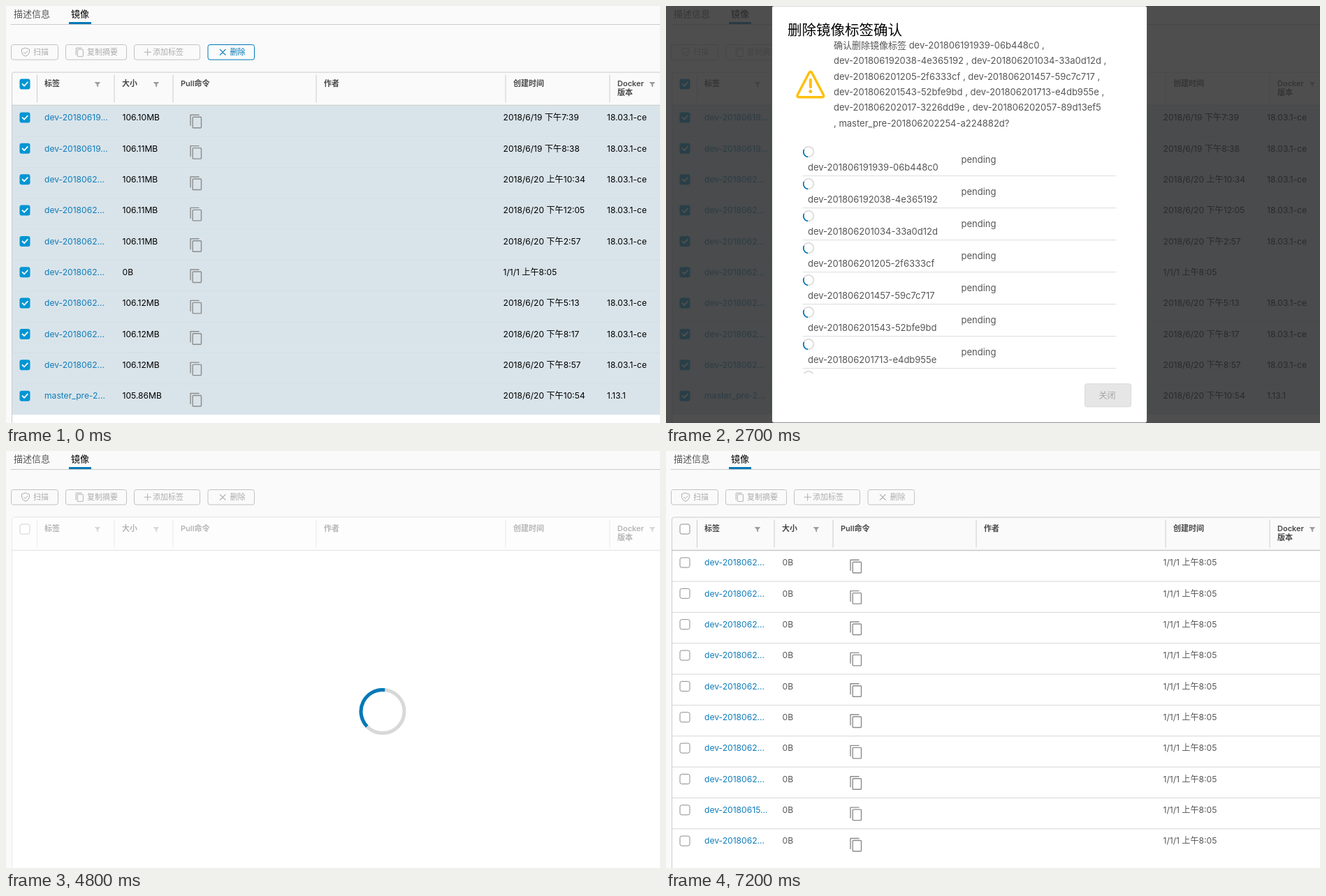
These frames come from a looping animation (936 by 598 pixels, 9200 ms). An HTML page:

```html
<!DOCTYPE html>
<html lang="zh">
<head>
<meta charset="utf-8">
<title>删除镜像标签</title>
<style>
  html, body { margin: 0; width: 100%; height: 100%; overflow: hidden; background: #fafafa; }
  svg { display: block; width: 936px; height: 598px; }
  text { font-family: Inter, "Noto Sans CJK SC", "Noto Sans CJK", sans-serif; white-space: pre; }
  .tab { font-size: 13px; }
  .btn { font-size: 11px; }
  .head { font-size: 11px; font-weight: 600; fill: #484848; }
  .cell { font-size: 12.1px; }
  .title { font-size: 20.5px; font-weight: 300; fill: #000; }
  .body { font-size: 13px; fill: #565656; }
  .action { font-size: 12px; }
</style>
</head>
<body>
<svg viewBox="0 0 936 598">
  <rect width="936" height="598" fill="#fafafa"/>
  <g id="page"></g>
  <g id="spinner"></g>
  <rect id="backdrop" width="936" height="598" fill="#313131"/>
  <g id="modal"></g>
</svg>
<script>
const LOOP = 9200, STEP = 100, ROW = 44.35;
const BLUE = '#0079b8', LINE = '#ccc';
const $ = id => document.getElementById(id);

const tags = ['dev-201806191939-06b448c0', 'dev-201806192038-4e365192', 'dev-201806201034-33a0d12d',
  'dev-201806201205-2f6333cf', 'dev-201806201457-59c7c717', 'dev-201806201543-52bfe9bd',
  'dev-201806201713-e4db955e', 'dev-201806202017-3226dd9e', 'dev-201806202057-89d13ef5',
  'master_pre-201806202254-a224882d'];
const sizes = ['106.10MB', '106.11MB', '106.11MB', '106.11MB', '106.11MB', '0B',
  '106.12MB', '106.12MB', '106.12MB', '105.86MB'];
const dates = ['2018/6/19 下午7:39', '2018/6/19 下午8:38', '2018/6/20 上午10:34', '2018/6/20 下午12:05',
  '2018/6/20 下午2:57', '1/1/1 上午8:05', '2018/6/20 下午5:13', '2018/6/20 下午8:17',
  '2018/6/20 下午8:57', '2018/6/20 下午10:54'];
const version = i => i === 5 ? '' : i === 9 ? '1.13.1' : '18.03.1-ce';
const shorten = tag => tag.slice(0, tag[10] === '2' ? 11 : 12) + '...';

const text = (x, y, s, cls, fill = '') =>
  `<text x="${x}" y="${y}" class="${cls}" ${fill && `style="fill:${fill}"`}>${s}</text>`;
const rect = (x, y, w, h, fill, stroke = 'none', r = 0, extra = '') =>
  `<rect x="${x}" y="${y}" width="${w}" height="${h}" rx="${r}" fill="${fill}" stroke="${stroke}" ${extra}/>`;
const path = (d, stroke, width = 1, fill = 'none') =>
  `<path d="${d}" stroke="${stroke}" stroke-width="${width}" fill="${fill}" stroke-linecap="round" stroke-linejoin="round"/>`;

function checkbox(cy, on) {
  return on
    ? rect(19.5, cy - 7.5, 15, 15, '#0095d3', 'none', 3) + path(`M23.5 ${cy}l2.6 2.7 4.8-5.2`, '#fff', 1.8)
    : rect(20, cy - 7, 14, 14, '#fff', '#8c8c8c', 2.5);
}

const copyIcon = (x, y, color, k = 1) => `<g transform="translate(${x} ${y}) scale(${k})">`
  + path('M1 16V1H13', color, 1.4) + rect(4.2, 4, 12.3, 15.5, 'none', color, 1, 'stroke-width="1.4"') + '</g>';

const filterIcon = x => path(`M${x - 3.5} 109.5h7l-2.8 3v3.2l-1.4-.8v-2.4z`, '#999', .8, '#999');

function toolbar(active, focus) {
  const gray = '#adadad', border = '#c2c2c2', tone = active ? BLUE : gray;
  const frame = (x, w) => rect(x, 55.5, w, 21.5, 'none', border, 3);
  return frame(7.5, 67) + frame(85.5, 87) + frame(183.5, 94)
    + rect(289, 55.5, 66.5, 21.5, 'none', active ? BLUE : border, 3)
    + (focus ? rect(288.5, 54.5, 67.5, 23.5, 'none', '#1c5f88', 1, 'stroke-dasharray="1 1"') : '')
    + path('M28 60.2l5.5 2v4q-.6 4-5.5 6q-4.900-2-5.500-6v-4zM25.500 66.300l2 2 3.500-3.800', gray)
    + copyIcon(99.500, 59.500, gray, .66)
    + path('M198 66.200h9.500M202.700 61.500v9.500', gray)
    + path('M306.300 62.300l7.800 7.800M314.100 62.300l-7.800 7.800', tone, 1.200)
    + text(39, 70.300, '扫描', 'btn', gray) + text(116, 70.300, '复制摘要', 'btn', gray)
    + text(210, 70.300, '添加标签', 'btn', gray) + text(320.500, 70.300, '删除', 'btn', tone);
}

function tableHead(checked) {
  const labels = [[55, '标签'], [166, '大小'], [250, 'Pull命令'], [455, '作者'], [726, '创建时间'], [875, 'Docker']];
  return rect(8.5, 142, 940, 470, '#fff') + rect(8.5, 95, 940, 520, 'none', LINE, 3)
    + [44.5, 155, 239, 444, 715, 864].map(x => path(`M${x} 99V138`, LINE)).join('')
    + labels.map(([x, s]) => text(x, 115, s, 'head')).join('') + text(875, 128, '版本', 'head')
    + [131, 215, 925].map(filterIcon).join('')
    + checkbox(112, checked) + path('M8.5 142.5H936', '#c8c8c8', 1.4);
}

function tableRow(i, selected, hovered) {
  const cy = 160 + i * ROW, top = 142.7 + i * ROW, ink = selected ? '#000' : '#565656';
  const y = cy + 4.3;
  const bg = selected ? '#d9e4ea' : hovered ? '#eee' : '';
  const tag = selected ? tags[i] : i === 8 ? 'dev-20180615' : 'dev-2018062';
  return (bg ? rect(9, top, 927, ROW, bg) : '')
    + (i ? path(`M9 ${top}H936`, selected ? '#d3dee3' : '#d6d6d6') : '')
    + checkbox(cy, selected) + text(55, y, shorten(tag), 'cell', '#0f7cba')
    + text(166.5, y, selected ? sizes[i] : '0B', 'cell', ink)
    + copyIcon(263, cy - 4.700, '#8c8c8c')
    + text(711.5, y, selected ? dates[i] : '1/1/1 上午8:05', 'cell', ink)
    + text(860, y, selected ? version(i) : '', 'cell', ink);
}

function pageMarkup({ mode, focus, hover }) {
  const selected = mode === 'selected';
  return text(11, 16, '描述信息', 'tab', '#565656')
    + `<g font-weight="500">${text(93, 16, '镜像', 'tab', '#000')}</g>`
    + path('M7 26.5H936', LINE) + rect(90, 23, 32, 3, BLUE)
    + toolbar(selected, focus) + tableHead(selected)
    + (mode === 'loading' ? rect(8, 94.5, 928, 504, 'rgba(255,255,255,.6)')
      : tags.map((_, i) => tableRow(i, selected, hover === i)).join(''));
}

const polar = (cx, cy, r, deg) =>
  [cx + r * Math.cos(deg * Math.PI / 180), cy + r * Math.sin(deg * Math.PI / 180)].map(n => n.toFixed(2)).join(' ');

function ring(cx, cy, r, width, head, span) {
  return `<g fill="none" stroke-width="${width}"><circle cx="${cx}" cy="${cy}" r="${r}" stroke="#d8d8d8"/>`
    + `<path d="M${polar(cx, cy, r, head - span)}A${r} ${r} 0 0 1 ${polar(cx, cy, r, head)}" stroke="${BLUE}"/></g>`;
}

const question = ['确认删除镜像标签 ' + tags[0] + ' ,',
  ...[1, 3, 5].map(i => `${tags[i]} , ${tags[i + 1]} ,`),
  `${tags[7]} , ${tags[8]}`, `, ${tags[9]}?`];

function actionButton(x, y, label, fill, stroke, ink) {
  return rect(x + .5, y + .5, 66, 33, fill, stroke, 3) + text(x + 20.5, y + 21.300, label, 'action', ink);
}

// Rows still being deleted at each moment of the run.
function pendingRows(t) {
  if (t < 2700 || t >= 3100) return [];
  if (t < 2800) return tags.map((_, i) => i);
  return t < 2900 ? [1, 3, 6, 7, 8, 9] : t < 3000 ? [6, 7, 9] : [7, 9];
}

function modalMarkup(t) {
  const pending = pendingRows(t), asking = t < 2700;
  const wrapped = pending.filter(i => i < 9).length;
  const height = Math.min(597, 557 + 22 * wrapped), top = 298.8 - height / 2;
  const spin = 315 + (t - 3000) * .36;
  let y = 197.3, rows = '';
  tags.forEach((tag, i) => {
    const busy = pending.includes(i), last = i === 9;
    const h = last || busy ? 46 : 24.1;
    if (busy) rows += ring(52, y + 11.5, 7.3, 1.6, spin, 110);
    if (last) {
      rows += text(busy ? 67.5 : 51, y + 16, 'master_pre-201806202254-', 'body') + text(44, y + 38, 'a224882d', 'body');
    } else {
      rows += text(51, y + (busy ? 38 : 16.3), tag, 'body');
    }
    const [status, color] = asking ? ['pending', '#008000'] : busy ? ['pending', '#565656']
      : i === 5 ? ['删除成功', '#008000'] : ['删除失败', '#f00'];
    rows += text(270.5, y + h / 2 + 4.2, status, 'body', color);
    y += h;
    rows += path(`M44 ${y}H492`, '#ddd');
  });

  const by = height - 56;
  const hover = t >= 2000;
  const buttons = asking
    ? actionButton(369, by, '取消', '#fff', BLUE, BLUE)
      + actionButton(447, by, '删除', hover ? '#c92100' : '#e62700', hover ? '#c92100' : '#e62700', '#fff')
    : pending.length ? actionButton(447, by, '关闭', '#e6e6e6', '#dadada', '#a6a6a6')
    : actionButton(447, by, '关闭', '#004a70', BLUE, '#fff');

  return { top, height, markup:
    rect(-.5, -.5, 537, height + 1, '#fff', 'rgba(0,0,0,.45)', 3)
    + text(22, 41.5, '删除镜像标签确认', 'title')
    + path('M52.800 95.500q2-3.200 4 0l16.500 31.500q1.400 3.400-2 3.400h-33q-3.400 0-2-3.400z', '#fdc010', 3.500)
    + path('M54.800 105.500v10.500', '#fdc010', 4) + `<circle cx="54.8" cy="122.300" r="2.500" fill="#fdc010"/>`
    + question.map((s, i) => text(88, 60.8 + i * 22.350, s, 'body')).join('')
    + `<svg width="536" height="${height - 70}">${rows}</svg>` + buttons };
}

const ease = u => { u = Math.min(1, Math.max(0, u)); return u * u * (3 - 2 * u); };
let pageKey = '';

function draw(t) {
  const mode = t < 4400 ? 'selected' : t < 6200 ? 'loading' : 'fresh';
  const hover = t >= 6800 && t < 7200 ? Math.min(9, 5 + (t - 6800) / 50) : -1;
  const state = { mode, focus: mode === 'selected' && t >= 400, hover };
  const key = JSON.stringify(state);
  if (key !== pageKey) $('page').innerHTML = pageMarkup(state);
  pageKey = key;

  $('spinner').innerHTML = mode === 'loading' ? ring(539, 373.5, 31, 5, 276 + (t - 5800) * .36, 140) : '';

  const shown = ease((t - 1372) / 200) - ease((t - 4390) / 200);
  $('backdrop').setAttribute('opacity', .85 * shown);
  $('modal').setAttribute('opacity', shown);
  if (shown > 0) {
    const { top, height, markup } = modalMarkup(t);
    $('modal').innerHTML = markup;
    $('modal').setAttribute('transform', `translate(152 ${top - height * .25 * (1 - shown)})`);
  }
}

let lastStep = -1;
const start = performance.now();
function tick() {
  const t = Math.floor((performance.now() - start) % LOOP / STEP) * STEP;
  if (t !== lastStep) draw(lastStep = t);
  requestAnimationFrame(tick);
}
tick();
</script>
</body>
</html>
```
